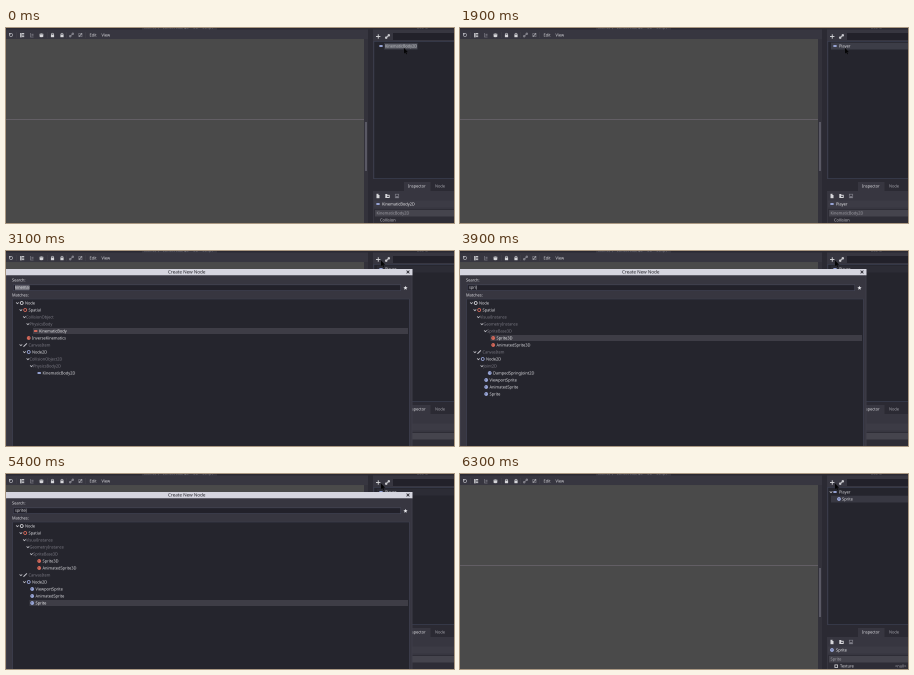
Write an HTML page with a canvas that moves like this. It is 448 by 195 pixels and loops after 7.1 s.

```html
<!DOCTYPE html>
<html lang="en">
<head>
<meta charset="utf-8">
<title>Adding a node</title>
<style>
html, body { margin: 0; width: 100%; height: 100%; overflow: hidden; background: #373640; }
canvas { display: block; width: 448px; height: 195px; }
</style>
</head>
<body>
<canvas id="stage" width="448" height="195"></canvas>
<script>
const LOOP = 7100, W = 448, H = 195, SCALE = 4;
const screen2d = document.getElementById('stage').getContext('2d');
// Drawn large, then halved twice, so tiny text stays smooth.
const layer = scale => {
  const canvas = document.createElement('canvas');
  canvas.width = W * scale;
  canvas.height = H * scale;
  return canvas.getContext('2d');
};
const ctx = layer(SCALE), half = layer(SCALE / 2);

const C = {
  base: '#373640', dark: '#25252d', field: '#22212a', view: '#4a4a4a',
  text: '#e2e2e6', mute: '#7f7e88', dim: '#85848d', select: '#3e3d46', edge: '#3d4152',
  red: '#e8705f', blue: '#a3b2e8', light: '#d5d5df', icon: '#d6d6da'
};

// Each row: depth, icon kind, name. Kind "-" has no icon.
const parse = s => s.split('|').map(r => ({ depth: +r[0], kind: r[1], name: r.slice(2) }));
const LISTS = {
  kinema: parse('0nNode|1sSpatial|2-CollisionObject|3-PhysicsBody|4kKinematicBody|2pInverseKinematics|1cCanvasItem|2bNode2D|3-CollisionObject2D|4-PhysicsBody2D|5KKinematicBody2D'),
  s: parse('0nNode|1sSpatial|2-VisualInstance|3-GeometryInstance|4pMeshInstance|4pParticles|4-SpriteBase3D|5pSprite3D|5pAnimatedSprite3D|2-CollisionObject|3-PhysicsBody|4kStaticBody|4kRigidBody|2pCollisionShape|1cCanvasItem|2bNode2D|3PViewportSprite|3PAnimatedSprite|3PSprite|3PPosition2D'),
  sp: parse('0nNode|1sSpatial|2-VisualInstance|3-GeometryInstance|4-SpriteBase3D|5pSprite3D|5pAnimatedSprite3D|2pCollisionShape|1cCanvasItem|2bNode2D|3-Joint2D|4PDampedSpringJoint2D|3PViewportSprite|3PAnimatedSprite|3PSprite|3PCollisionShape2D'),
  spri: parse('0nNode|1sSpatial|2-VisualInstance|3-GeometryInstance|4-SpriteBase3D|5pSprite3D|5pAnimatedSprite3D|1cCanvasItem|2bNode2D|3-Joint2D|4PDampedSpringJoint2D|3PViewportSprite|3PAnimatedSprite|3PSprite')
};
LISTS.sprite = LISTS.spri.filter(r => !r.name.includes('Joint'));
LISTS.spr = LISTS.spri;
LISTS.sprit = LISTS.sprite;

// Latest value whose start time has passed.
const at = (t, steps) => steps.reduce((v, [start, next]) => t >= start ? next : v, steps[0][1]);
const SEARCH = [[0, 'kinema'], [3400, 's'], [3600, 'sp'], [3700, 'spr'], [3900, 'spri'], [4000, 'sprit'], [4100, 'sprite']];
const PICK = [[0, 4], [3400, 1], [3600, 5], [4700, 6], [4900, 8], [5100, 9], [5300, 10], [5400, 11]];
const ROW_TINT = [[0, C.dark], [900, '#3c3d47'], [2300, '#2c2c35'], [6100, '#383842']];
const POINTER = [[0, 398, 20], [1800, 398, 20], [1900, 385, 20], [2300, 381, 17], [2600, 376, 11], [2800, 375, 9.5], [LOOP, 375, 9.5]];

function rect(x, y, w, h, color) {
  ctx.fillStyle = color;
  ctx.fillRect(x, y, w, h);
}
function text(s, x, y, color = C.text, size = 3.95) {
  ctx.font = `${size}px "Noto Sans", sans-serif`;
  ctx.fillStyle = color;
  ctx.fillText(s, x, y + 1.4);
}
function line(points, color, width = 0.7, closed = false) {
  ctx.beginPath();
  points.forEach(([x, y]) => ctx.lineTo(x, y));
  if (closed) ctx.closePath();
  ctx.strokeStyle = color;
  ctx.lineWidth = width;
  ctx.stroke();
}
function ring(x, y, r, color, width = 0.8) {
  ctx.beginPath();
  ctx.arc(x, y, r, 0, 7);
  ctx.strokeStyle = color;
  ctx.lineWidth = width;
  ctx.stroke();
}
function blob(x, y, w, h, color) {
  ctx.beginPath();
  ctx.roundRect(x - w / 2, y - h / 2, w, h, Math.min(w, h) / 2);
  ctx.fillStyle = color;
  ctx.fill();
}
const arrow = (x, y) => line([[x - 1.3, y - 0.6], [x, y + 0.7], [x + 1.3, y - 0.6]], '#c5c5cc', 0.8);

function nodeIcon(kind, x, y) {
  if (kind === 'n') ring(x, y, 1.5, '#e4e4e8');
  if (kind === 's') ring(x, y, 1.5, C.red);
  if (kind === 'b') ring(x, y, 1.5, C.blue);
  if (kind === 'c') line([[x - 1.7, y + 1.7], [x + 1.7, y - 1.6]], '#c9c9d0', 1);
  if (kind === 'k' || kind === 'K') blob(x, y, 3.6, 1.8, kind === 'k' ? C.red : C.blue);
  if (kind === 'p' || kind === 'P') {
    blob(x, y, 3.8, 3.8, kind === 'p' ? C.red : C.blue);
    rect(x - 1, y - 0.5, 0.6, 0.8, C.dark);
    rect(x + 0.5, y - 0.5, 0.6, 0.8, C.dark);
  }
}

function padlock(x, y) {
  ring(x, y - 0.9, 1.1, C.icon, 0.6);
  rect(x - 1.6, y - 0.6, 3.2, 2.6, C.icon);
}
function chain(x, y, color = C.icon) {
  line([[x - 1.7, y + 1.6], [x + 1.7, y - 1.6]], color, 0.8);
  ring(x - 1.3, y + 1.2, 0.9, color, 0.7);
  ring(x + 1.3, y - 1.2, 0.9, color, 0.7);
}

function toolbar() {
  rect(0, 0, 362, 11, C.base);
  rect(0, 0, W, 1.5, '#2a2932');
  rect(136, 0, 75, 1.5, C.base);
  text('scene(*)    [unsaved](*)', 138, -1, C.dim);
  text('2D    3D    Script', 178, -1, C.dim);
  ring(5, 7, 1.6, '#b2b2b9', 0.7);
  rect(3, 5, 1.6, 1.6, '#b2b2b9');
  rect(14.2, 5, 1.4, 4.4, C.icon);
  for (let i = 0; i < 3; i++) rect(16, 5 + i * 1.6, 2.2, 0.9, C.icon);
  line([[24.5, 5], [24.5, 9], [27.5, 9]], C.dim, 0.6);
  rect(25.5, 5.8, 2, 2, '#6a6973');
  for (let i = 0; i < 4; i++) rect(33.6 + i, 5 + Math.abs(i - 1.5) * 0.5, 0.7, 3, C.icon);
  blob(35.4, 8, 3.6, 2.4, C.icon);
  padlock(46.5, 7.2);
  padlock(56, 7.2);
  chain(65.5, 7, C.dim);
  line([[72.8, 5.4], [76, 5.4], [76, 8.6], [72.8, 8.6]], C.dim, 0.6, true);
  line([[73, 8.5], [76, 5.4]], C.icon, 0.6);
  for (const x of [10, 41, 60.5, 79.5]) rect(x, 4, 0.4, 6, '#47464f');
  text('Edit', 83.5, 7);
  text('View', 95.5, 7);
}

function viewport() {
  rect(0, 11, 358, 184, C.view);
  rect(0, 10.5, 358, 0.6, '#3f3f44');
  rect(0, 91, 358, 1, '#625e64');
  rect(358, 11, 4, 184, '#33323b');
  rect(359, 94, 2, 49, '#595864');
  rect(362, 0, 5, H, '#2b2a33');
}

function sceneDock(t) {
  rect(367, 1.5, 81, 152, C.base);
  text('Scene', 411, -1, C.dim);
  rect(370, 8.1, 4.4, 0.9, C.icon);
  rect(371.8, 6.3, 0.9, 4.4, C.icon);
  chain(381.5, 8.5);
  rect(387, 5, 61, 7, C.field);
  rect(367.5, 13, 80.5, 138, C.edge);
  rect(368.2, 13.7, 79.8, 136.6, C.dark);

  const added = t >= 6100;
  rect(371, (added ? 25 : 18) - 3.3, 77, 6.8, at(t, ROW_TINT));
  if (added) {
    arrow(371, 18);
    nodeIcon('P', 379, 25);
    text('Sprite', 382, 25);
  }
  nodeIcon('K', 375, 18);
  if (t < 900) rename(t);
  else text('Player', 379, 18);
}

function rename(t) {
  rect(378, 15, 33.5, 6.3, '#4a4d5a');
  rect(378.4, 15.4, 32.7, 5.5, C.field);
  if (t < 300) {
    rect(379, 15.8, 32, 4.8, '#62646c');
    text('KinematicBody2D', 379, 18, '#b4b5bb', 3.85);
    return;
  }
  const typed = 'Player'.slice(0, Math.floor((t - 300) / 100) + 1);
  text(typed, 379, 18);
  rect(379.3 + ctx.measureText(typed).width, 16, 0.4, 4, C.text);
}

function inspector(t) {
  const added = t >= 6100;
  const title = added ? 'Sprite' : t >= 900 ? 'Player' : 'KinematicBody2D';
  rect(367, 151, 81, 12, '#2b2a33');
  rect(398, 154, 26.5, 9, C.base);
  text('Inspector', 402, 158);
  text('Node', 429, 158, '#a5a5ad');
  rect(367, 163, 81, 32, C.base);
  rect(370.5, 165.8, 3, 4.4, C.icon);
  rect(372.5, 165.8, 1, 1.2, C.base);
  rect(379.3, 166, 2, 1, C.icon);
  rect(379.3, 166.8, 4.4, 3.2, C.icon);
  rect(381, 167.8, 2, 1, C.base);
  line([[389.3, 166.2], [392.7, 166.2], [392.7, 169.8], [389.3, 169.8]], C.mute, 0.7, true);
  rect(390, 168.2, 2, 1.5, C.mute);
  rect(368, 172.5, 80, 7, '#3c3b45');
  nodeIcon(added ? 'P' : 'K', 372, 176);
  text(title, 376, 176, '#f2f2f4');
  rect(368, 181, 80, 14, '#2e2d36');
  rect(369, 182, 79, 6.5, '#45444d');
  text(added ? 'Sprite' : 'KinematicBody2D', 370.5, 185.2, '#a3a2aa');
  if (added) {
    rect(374.5, 190.5, 3.4, 3.4, C.icon);
    rect(375.3, 191.3, 1.8, 1.8, C.dark);
    text('Texture', 380, 192.2);
    text('<null>', 435, 192.2, '#a9a9b1');
  } else {
    text('Collision', 374, 192.2, '#c2c2c8');
  }
}

function dialog(t) {
  rect(0, 18, 406.5, 177, '#3e3d48');
  rect(0, 18, 406.5, 6.3, C.light);
  rect(1, 24.3, 404.5, 171, C.base);
  text('Create New Node', 162, 21.2, '#1f1e25', 4.55);
  line([[400.6, 19.6], [403.4, 22.4]], '#1f1e25', 0.8);
  line([[403.4, 19.6], [400.6, 22.4]], '#1f1e25', 0.8);
  text('Search:', 6, 29.2);
  text('Matches:', 6, 44);

  const query = at(t, SEARCH);
  rect(7, 33.6, 388, 6.2, '#4a4c5e');
  rect(7.5, 34.1, 387, 5.2, C.field);
  if (t < 3400) rect(9, 34.3, 14, 4.8, '#6e6e77');
  text(query, 9, 36.4);
  rect(9.3 + ctx.measureText(query).width, 34.6, 0.4, 4, C.text);
  ctx.beginPath();
  for (let i = 0; i < 10; i++) {
    const a = i * Math.PI / 5 - Math.PI / 2, r = i % 2 ? 1 : 2.2;
    ctx.lineTo(399.5 + Math.cos(a) * r, 37 + Math.sin(a) * r);
  }
  ctx.fillStyle = '#e6e6ea';
  ctx.fill();

  rect(6.5, 47.8, 397, 148, C.edge);
  rect(7, 48.3, 396, 147, C.dark);
  const rows = LISTS[query], picked = at(t, PICK);
  rows.forEach((row, i) => listRow(row, rows[i + 1], 52 + i * 7, i === picked));
}

function listRow({ depth, kind, name }, next, y, picked) {
  const x = 19 + depth * 3.5;
  const bare = kind === '-';
  if (picked) rect(x - 6, y - 3, 402 - x + 6, 6, C.select);
  if (next && next.depth > depth) arrow(x - 7.6, y);
  nodeIcon(kind, x - 3.3, y);
  text(name, bare ? x - 6 : x, y, bare || kind === 'c' ? C.mute : picked ? '#f4f4f6' : C.text);
}

function pointer(t) {
  const i = POINTER.findIndex(p => p[0] > t);
  const [t0, x0, y0] = POINTER[i - 1], [t1, x1, y1] = POINTER[i];
  const k = (Math.floor(t / 100) * 100 - t0) / (t1 - t0);
  const x = x0 + (x1 - x0) * k, y = y0 + (y1 - y0) * k;
  const shape = [[0, 0], [0, 5.6], [1.3, 4.5], [2.2, 6.4], [3, 6], [2.2, 4.2], [3.9, 4.1]];
  line(shape.map(([dx, dy]) => [x + dx, y + dy]), '#2c2c32', 0.5, true);
  ctx.fillStyle = '#050506';
  ctx.fill();
}

function draw(t) {
  ctx.setTransform(SCALE, 0, 0, SCALE, 0, 0);
  rect(0, 0, W, H, C.base);
  viewport();
  toolbar();
  sceneDock(t);
  inspector(t);
  if (t >= 3100 && t < 6100) dialog(t);
  pointer(t);
  half.drawImage(ctx.canvas, 0, 0, half.canvas.width, half.canvas.height);
  screen2d.drawImage(half.canvas, 0, 0, W, H);
}

const begin = performance.now();
function frame() {
  draw((performance.now() - begin) % LOOP);
  requestAnimationFrame(frame);
}
frame();
</script>
</body>
</html>
```
